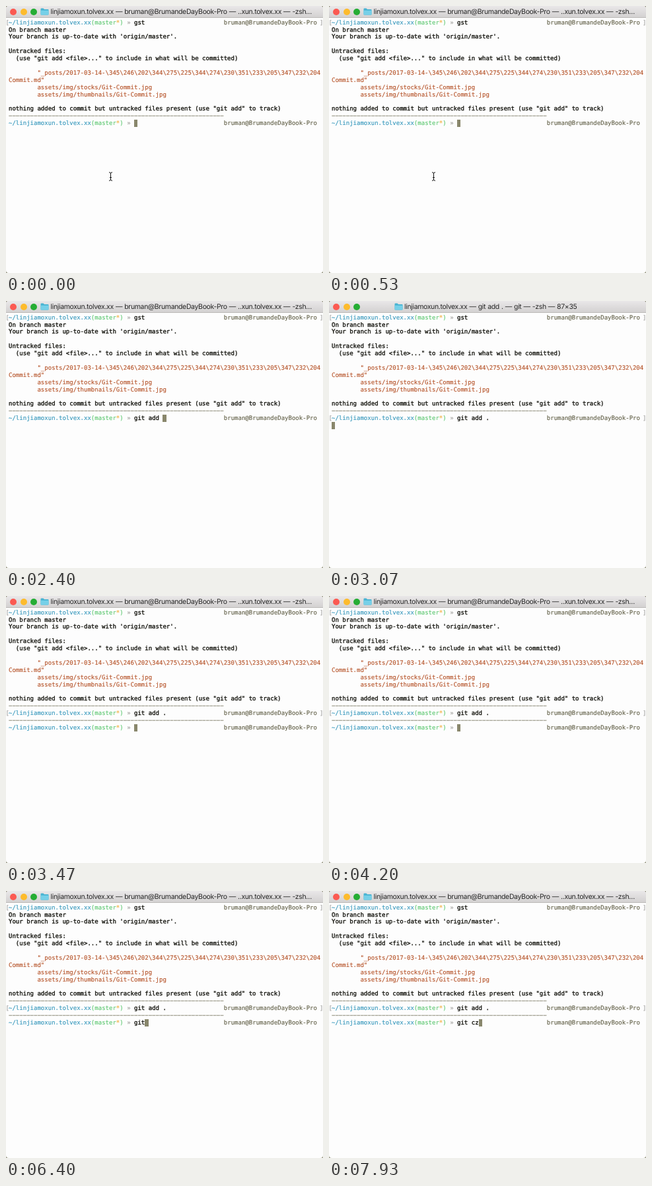
These frames come from a looping animation (480 by 404 pixels, 8000 ms). An HTML page:

```html
<!DOCTYPE html>
<html lang="en">
<head>
<meta charset="utf-8">
<title>Terminal</title>
<style>
  html, body { margin: 0; width: 100%; height: 100%; overflow: hidden; background: #8d8c76; }
  #window {
    position: absolute; left: 0; top: 0; width: 480px; height: 404px;
    overflow: hidden; border-radius: 4px; background: #fdfdfd;
    text-rendering: geometricPrecision;
  }
  #bar {
    position: absolute; left: 0; top: 0; width: 480px; height: 18px;
    background: linear-gradient(#e9e7e8, #d2d0d0);
    box-shadow: inset 0 -1px #bdbbb9;
  }
  .light { position: absolute; top: 3.7px; width: 10px; height: 10px; border-radius: 50%; }
  .title {
    position: absolute; top: -.5px; display: flex; align-items: center; height: 18px;
    white-space: pre; color: #282828;
    font: 10.5px Inter, sans-serif; letter-spacing: -.35px; word-spacing: .5px;
  }
  .title svg { width: 13px; height: 11px; margin-right: 2.5px; }
  .row {
    position: absolute; left: 4px; height: 10.9px; white-space: pre;
    font: 9.02px/10.9px "DejaVu Sans Mono", monospace;
    -webkit-text-stroke: .15px currentColor;
  }
  .text { color: #15150f; -webkit-text-stroke-width: .35px; }
  .file { color: #b6542a; }
  .rule, .host { color: #66644c; }
  .path { color: #3899bd; }
  .branch { color: #5fc873; }
  .dirty { color: #f0ae3c; }
  .arrow, .mark { color: #a3a3a0; }
  .host { position: absolute; left: 325.8px; }
  .mark { position: absolute; left: -4.6px; }
  .mark.end { left: 471px; }
  #caret { position: absolute; width: 5.4px; height: 10.9px; margin-top: -1.4px; background: #89876c; }
  #pointer { position: absolute; left: 154px; top: 251px; width: 9px; height: 14px; }
</style>
</head>
<body>
<div id="window">
  <div id="bar">
    <i class="light" style="left:6px;background:#fb5a52"></i>
    <i class="light" style="left:21.5px;background:#fdbb2d"></i>
    <i class="light" style="left:36.5px;background:#25ad34"></i>
    <div class="title" id="idleTitle" style="left:52px"></div>
    <div class="title" id="busyTitle" style="left:98.5px"></div>
  </div>
  <div id="screen"></div>
  <div id="caret"></div>
  <svg id="pointer" viewBox="0 0 9 14" fill="none" stroke="#111">
    <path d="M2 .7Q4.5 .7 4.5 2.5Q4.5 .7 7 .7M4.5 2V12M2 13.3Q4.5 13.3 4.5 11.5Q4.5 13.3 7 13.3M3 8.5H6"/>
  </svg>
</div>
<script>
const LOOP = 8000, CELL = 5.43, LEADING = 10.9, LEFT = 4, TOP = 20.6, PROMPT_COLS = 35;
const SITE = "linjiamoxun.tolvex.xx";
const HOST = "bruman@BrumandeDayBook-Pro";
const RUN = 2930, DONE = 3270;

const first = { row: 14, text: "git add .", keys: [1000, 1130, 1270, 1600, 1800, 1930, 2070, 2270, 2530] };
const second = { row: 16, text: "git cz", keys: [5870, 6070, 6200, 6670, 7070, 7330] };

const byId = id => document.getElementById(id);
const screen = byId("screen"), caret = byId("caret");
const span = (kind, text) => `<span class="${kind}">${text}</span>`;
const show = (el, on) => { el.style.visibility = on ? "visible" : "hidden"; };

function addRow(index, kind, html) {
  const el = document.createElement("div");
  el.className = "row " + kind;
  el.style.top = TOP + index * LEADING + "px";
  el.innerHTML = html;
  screen.append(el);
  return el;
}

function addPrompt(index, command = "") {
  return addRow(index, "", span("mark", "[") + span("path", "~/" + SITE) +
    span("branch", "(master") + span("dirty", "*") + span("branch", ")") +
    span("arrow", " » ") + span("text command", command) +
    span("host", HOST) + span("mark end", "]"));
}

const folder = `<svg viewBox="0 0 13 11"><path d="M.5 1.5Q.5 .5 1.5 .5H4.5L6 2H11.5Q12.5 2 12.5 3V9.5Q12.5 10.5 11.5 10.5H1.5Q.5 10.5 .5 9.5Z" fill="#48b4d2"/><path d="M.5 3.8H12.5V9.5Q12.5 10.5 11.5 10.5H1.5Q.5 10.5 .5 9.5Z" fill="#76d0e8"/></svg>`;
byId("idleTitle").innerHTML = `${folder}<span>${SITE} — ${HOST} — ..${SITE.slice(8)} — -zsh…</span>`;
byId("busyTitle").innerHTML = `${folder}<span>${SITE} — git add . — git — -zsh — 87×35</span>`;

// The minus sign is wider than a hyphen, so the rule reads as nearly solid.
const indent = " ".repeat(8), rule = "−".repeat(60);
addPrompt(0, "gst");
[
  [1, "text", "On branch master"],
  [2, "text", "Your branch is up-to-date with 'origin/master'."],
  [4, "text", "Untracked files:"],
  [5, "text", '  (use "git add &lt;file&gt;..." to include in what will be committed)'],
  [7, "file", indent + '"_posts/2017-03-14-\\345\\246\\202\\344\\275\\225\\344\\274\\230\\351\\233\\205\\347\\232\\204'],
  [8, "file", 'Commit.md"'],
  [9, "file", indent + "assets/img/stocks/Git-Commit.jpg"],
  [10, "file", indent + "assets/img/thumbnails/Git-Commit.jpg"],
  [12, "text", 'nothing added to commit but untracked files present (use "git add" to track)'],
  [13, "rule", rule]
].forEach(line => addRow(...line));

const nextRule = addRow(15, "rule", rule);
for (const line of [first, second]) {
  line.el = addPrompt(line.row);
  line.command = line.el.querySelector(".command");
  line.marks = line.el.querySelectorAll(".mark");
}

function typeLine(line, t) {
  const count = line.keys.filter(key => key <= t).length;
  line.command.textContent = line.text.slice(0, count);
  return PROMPT_COLS + count;
}

function placeCaret(col, row) {
  caret.style.left = LEFT + col * CELL + "px";
  caret.style.top = TOP + row * LEADING + "px";
}

function draw(t) {
  const entered = t >= RUN, done = t >= DONE, busy = entered && !done;
  show(byId("pointer"), t < first.keys[0]);
  show(byId("busyTitle"), busy);
  show(byId("idleTitle"), !busy);
  show(nextRule, done);
  show(second.el, done);
  first.marks.forEach(mark => show(mark, entered));
  second.marks.forEach(mark => show(mark, false));

  const firstCol = typeLine(first, t), secondCol = typeLine(second, t);
  if (done) placeCaret(secondCol, second.row);
  else if (busy) placeCaret(0, first.row + 1);
  else placeCaret(firstCol, first.row);
}

const start = performance.now();
function tick() {
  draw((performance.now() - start) % LOOP);
  requestAnimationFrame(tick);
}
tick();
</script>
</body>
</html>
```
